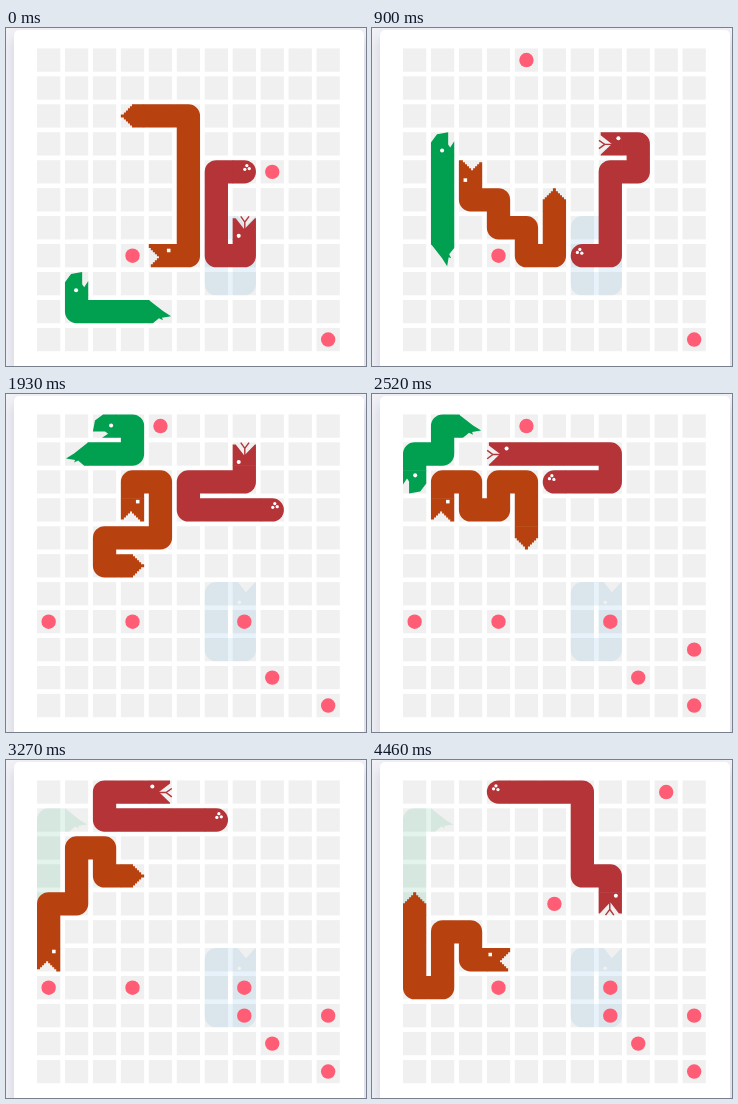
An HTML page that plays this animation: 360 by 338 pixels, repeating every 4.56 s.

```html
<!DOCTYPE html>
<html lang="en">
<head>
<meta charset="utf-8">
<title>Snakes</title>
<style>
  html, body { margin: 0; width: 100%; height: 100%; overflow: hidden; background: #f1f1f6; }
  .card {
    position: absolute; left: 8px; top: 2px; right: 2px; bottom: 0;
    border-radius: 5px 5px 0 0; background: #fff; box-shadow: 0 8px 14px rgba(70, 65, 130, .2);
  }
  svg { position: absolute; left: 0; top: 0; width: 100%; height: 100%; }
</style>
</head>
<body>
<div class="card"></div>
<svg viewBox="0 0 360 338">
  <g transform="translate(31 20.4) scale(1.0127)">
    <g id="grid" fill="#f0f0f0"></g>
    <g id="game"></g>
  </g>
</svg>
<script>
const LOOP = 4560, CELL = 23, PITCH = 27.6, MID = CELL / 2;
const MOVES = [150, 300, 450, 600, 900, 1050, 1200, 1340, 1490, 1640, 1930, 2080, 2230,
  2380, 2520, 2670, 2820, 3120, 3270, 3420, 3560, 3710, 3860, 4010, 4310, 4460];
const DIRS = { R: [1, 0], L: [-1, 0], U: [0, -1], D: [0, 1] };
const TURN = {
  R: '',
  L: `translate(${CELL}) scale(-1 1)`,
  U: `rotate(-90 ${MID} ${MID})`,
  D: `rotate(90 ${MID} ${MID})`
};

const dot = (x, y, r, fill = '#fff') => `<circle cx="${x}" cy="${y}" r="${r}" fill="${fill}"/>`;

// Heads and tails are drawn for a snake travelling right.
const fang = {
  head: `<path d="M0 0H21V3L10 11.5 21 22V23H0Z"/>
    <path d="M9 12H17L22.7 8M17 12L22.7 16.2" fill="none" stroke="currentColor" stroke-width="1.4"/>` + dot(3.5, 6, 2),
  tail: '<path d="M23 0H11.5a11.5 11.5 0 0 0 0 23H23Z"/>' + dot(9, 5.3, 1.6) + dot(11, 9, 1.6) + dot(6.6, 8.3, 1.6)
};
const pixel = {
  head: `<path d="M0 0H23V4h-2v2h-2v2h-2v2h-2v2h-2v2h2v2h2v2h2v2h2v3H0Z"/>
    <path d="M1.6 4.6h3.5v3.5h-3.5z" fill="#fff"/>`,
  tail: '<path d="M23 0H11v2h-2v2h-2v2h-2v2h-2v2H0v3h3v2h2v2h2v2h2v2h2v2H23Z"/>'
};
const beak = {
  head: '<path d="M0 0H13L21 6 23 17H11L8 19 14 23H0Z"/>' + dot(5, 11, 2),
  tail: '<path d="M23 0L9 11 1 16 10 17.5 9 20 13 18 19 23H23Z"/>'
};
const notch = {
  head: '<path d="M0 0H23V5L13 13 23 22.5V23H0Z"/>' + dot(3, 6.5, 1.8),
  tail: ''
};

// Each path starts at the tail cell; the first `size` cells are the opening pose.
const snakes = [
  { look: notch, color: '#288cd2', start: [7, 6], size: 7, dies: 0, path: 'LDDRUU' },
  { look: beak, color: '#00a050', start: [4, 9], size: 5, dies: 17, path: 'LLLU' + 'UUUUU' + 'UURRUL' + 'LDLD' + 'DD' },
  { look: pixel, color: '#b8420f', start: [3, 2], size: 9, eats: [20],
    path: 'RRDDDDDL' + 'ULULU' + 'RRUULD' + 'LULD' + 'DLDD' + 'DRUU' + 'RDR' },
  { look: fang, color: '#b43438', start: [7, 4], size: 7, eats: [3, 19],
    path: 'LDDDRU' + 'UURUL' + 'LLURRU' + 'LLLL' + 'LURR' + 'RRDD' + 'DRD' }
];
for (const s of snakes) {
  s.cells = [s.start];
  for (const d of s.path) {
    const [x, y] = s.cells.at(-1), [dx, dy] = DIRS[d];
    s.cells.push([x + dx, y + dy]);
  }
}

// x, y, move it appears on, move it is eaten on
const foods = [[8, 4, 0, 3], [3, 7, 0], [10, 10, 0], [4, 0, 3, 19], [0, 7, 7, 20], [7, 7, 9],
  [8, 9, 11], [10, 8, 13], [7, 8, 17], [5, 4, 25], [9, 0, 26]];

const center = n => n * PITCH + MID;
const place = (shape, [x, y], dir) =>
  `<g transform="translate(${x * PITCH} ${y * PITCH}) ${TURN[dir]}">${shape}</g>`;

function drawSnake({ look, color, size, dies = Infinity, eats = [], path, cells }, move) {
  const step = Math.min(move, dies);
  const head = step + size - 1;
  const tail = step - eats.filter(e => step > e).length;
  const points = cells.slice(tail, head + 1).map(([x, y]) => [center(x), center(y)]);
  const shift = (p, dir, by) => DIRS[dir].forEach((d, i) => p[i] += d * by);
  shift(points[0], path[tail], MID - .5);
  shift(points.at(-1), path[head - 1], .5 - MID);
  return `<g fill="${color}" color="${color}" opacity="${move >= dies ? .1 : 1}">
    <polyline points="${points.join(' ')}" fill="none" stroke="${color}" stroke-width="${CELL}" stroke-linejoin="round"/>
    ${place(look.tail, cells[tail], path[tail])}${place(look.head, cells[head], path[head - 1])}</g>`;
}

function drawGame(move) {
  const food = foods.filter(([, , born, eaten = Infinity]) => move >= born && move < eaten);
  return snakes.map(s => drawSnake(s, move)).join('') +
    food.map(([x, y]) => dot(center(x), center(y), 7.1, '#ff5c75')).join('');
}

const grid = document.getElementById('grid'), game = document.getElementById('game');
grid.innerHTML = Array.from({ length: 121 }, (_, i) =>
  `<rect x="${i % 11 * PITCH}" y="${Math.floor(i / 11) * PITCH}" width="${CELL}" height="${CELL}"/>`).join('');

const begin = performance.now();
let shown = -1;
function frame() {
  const time = (performance.now() - begin) % LOOP;
  const move = MOVES.filter(m => time >= m).length;
  if (move !== shown) game.innerHTML = drawGame(shown = move);
  requestAnimationFrame(frame);
}
frame();
</script>
</body>
</html>
```
